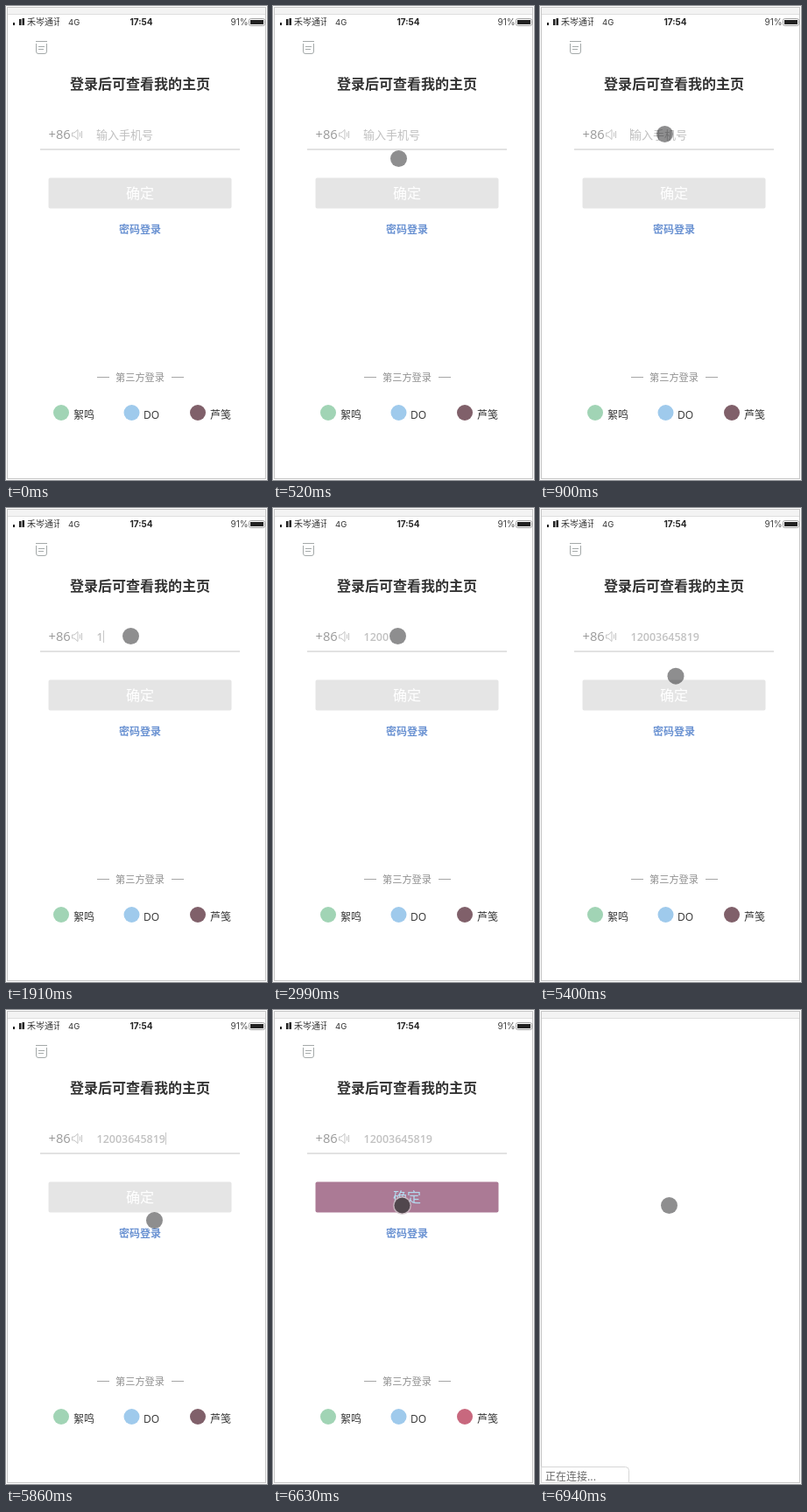
Animation of 298 by 542 pixels, one loop 8000 ms. Source, as an HTML page with a canvas:

```html
<!DOCTYPE html>
<html lang="zh-CN">
<head>
<meta charset="utf-8">
<title>登录</title>
<style>
html, body { margin: 0; width: 298px; height: 542px; overflow: hidden; background: #fff; }
canvas { display: block; }
</style>
</head>
<body>
<canvas id="stage" width="298" height="542"></canvas>
<script>
const ctx = document.getElementById('stage').getContext('2d');
const LOOP = 8000, TICK = 77.3;
const CJK = '"Noto Sans CJK SC", "Noto Sans CJK", sans-serif';
const LATIN = '"Open Sans", "Noto Sans", sans-serif';
const STATUS = 'Inter, Roboto, sans-serif';

const PHONE = '12003645819';
const KEY_TIMES = [1910, 1990, 2300, 2450, 3140, 3370, 3760, 4000, 4240, 4620, 4850];
const FOCUS = 870, PRESS = 6630, RELEASE = 6710, LEAVE = 6940;

// Pointer waypoints: time, x, y
const PATH = [
  [130, 178, 296], [520, 143.5, 174.5], [750, 142.5, 146.5],
  [5255, 142.5, 146.5], [5560, 161, 214], [5860, 169.5, 240.5],
  [6020, 147.5, 223.5]
];

function text(str, x, y, font, color, align = 'left') {
  ctx.font = font;
  ctx.fillStyle = color;
  ctx.textAlign = align;
  ctx.textBaseline = 'alphabetic';
  ctx.fillText(str, x, y);
}

function rect(x, y, w, h, color) {
  ctx.fillStyle = color;
  ctx.fillRect(x, y, w, h);
}

function disc(x, y, r, color) {
  ctx.fillStyle = color;
  ctx.beginPath();
  ctx.arc(x, y, r, 0, Math.PI * 2);
  ctx.fill();
}

function strokePath(d, color, width = 1) {
  ctx.strokeStyle = color;
  ctx.lineWidth = width;
  ctx.stroke(new Path2D(d));
}

function drawWindow() {
  rect(0, 0, 298, 542, '#fff');
  rect(2, 2, 295, 7, '#f3f3f3');
  rect(2, 9, 295, 1, '#dedede');
  ctx.strokeStyle = '#c6c6c6';
  ctx.lineWidth = 1;
  ctx.strokeRect(1.5, 1.5, 295, 539);
}

function drawStatusBar() {
  rect(8, 19, 2, 3, '#222');
  rect(15, 15, 2.5, 7, '#222');
  rect(18.5, 14, 2.5, 8, '#222');
  ctx.save();
  ctx.beginPath();
  ctx.rect(22, 10, 39, 16);
  ctx.clip();
  text('禾岑通讯', 24, 22, '10px ' + CJK, '#333');
  ctx.restore();
  text('4G', 71, 22, '9.5px ' + STATUS, '#333');
  text('17:54', 154.5, 22, 'bold 10px ' + STATUS, '#222', 'center');
  text('91%', 256.5, 22, '10px ' + STATUS, '#444');
  ctx.strokeStyle = '#a4a4a4';
  ctx.lineWidth = 1;
  ctx.beginPath();
  ctx.roundRect(277.5, 14.5, 18, 8, 2);
  ctx.stroke();
  rect(279, 16, 15, 5, '#222');
}

function drawIcons() {
  strokePath('M34 40.5H47M46.5 43V52Q46.5 54.5 44 54.5H37Q34.5 54.5 34.5 52V43M37 46.5H44M37 49.5H43', '#a4a9a9');
  strokePath('M75.5 145H78L82 141.5V152.5L78 149H75.5ZM84.5 144.5V149.5M86.5 143V151', '#c4c4c4');
}

function drawInput(t) {
  text('+86', 48.5, 152, '14.7px ' + LATIN, '#999');
  rect(39, 163, 228, 2, '#e2e2e2');

  const count = KEY_TIMES.filter(k => k <= t).length;
  const font = '600 12.5px ' + LATIN;
  let caretX = 103;
  if (count) {
    const typed = PHONE.slice(0, count);
    text(typed, 103.5, 152, font, '#c2c2c2');
    caretX = Math.round(103.5 + ctx.measureText(typed).width);
  } else {
    text('输入手机号', 103, 152, '13px ' + CJK, '#c0c0c0');
  }

  const lastKey = count ? KEY_TIMES[count - 1] : FOCUS;
  const caretOn = t >= FOCUS && t < PRESS && Math.floor((t - lastKey) / 500) % 2 === 0;
  if (caretOn) rect(caretX, 140, 1, 14, '#c8c8c8');
}

function drawButton(pressed) {
  ctx.fillStyle = pressed ? '#ab7a95' : '#e5e5e5';
  ctx.beginPath();
  ctx.roundRect(48.5, 196.5, 209, 35, 2);
  ctx.fill();
  text('确定', 153, 220, '16px ' + CJK, pressed ? '#b4dcf0' : '#fff', 'center');
}

function drawThirdParty(pressed) {
  text('第三方登录', 153, 428.5, '11.2px ' + CJK, '#8e8e8e', 'center');
  rect(104, 424, 14, 1, '#a6a6a6');
  rect(189, 424, 14, 1, '#a6a6a6');
  const links = [
    [63, 77, '絮鸣', '#a1d4b5', CJK],
    [143.5, 157, 'DO', '#9fcaec', LATIN],
    [219, 233, '芦笺', pressed ? '#c8687e' : '#80606a', CJK]
  ];
  for (const [iconX, x, label, color, family] of links) {
    disc(iconX, 465, 9, color);
    text(label, x, 472, '12px ' + family, '#333');
  }
}

function drawLogin(t) {
  const pressed = t >= PRESS;
  drawStatusBar();
  drawIcons();
  text('登录后可查看我的主页', 153, 95, 'bold 16px ' + CJK, '#333', 'center');
  drawInput(t);
  drawButton(pressed);
  text('密码登录', 153, 260, 'bold 12px ' + CJK, '#6a92d2', 'center');
  drawThirdParty(pressed);
}

function drawLoading() {
  ctx.fillStyle = '#fff';
  ctx.strokeStyle = '#d6d6d6';
  ctx.lineWidth = 1;
  ctx.beginPath();
  ctx.roundRect(1.5, 522.5, 100, 18, [0, 4, 0, 0]);
  ctx.fill();
  ctx.stroke();
  text('正在连接...', 6, 538, '12px ' + CJK, '#6a6a6a');
}

function pointerAt(t) {
  const next = PATH.findIndex(p => p[0] > t);
  if (next < 0) return PATH[PATH.length - 1].slice(1);
  if (next === 0) return PATH[0].slice(1);
  const [t0, x0, y0] = PATH[next - 1], [t1, x1, y1] = PATH[next];
  const u = (t - t0) / (t1 - t0), e = u * (2 - u);
  return [x0 + (x1 - x0) * e, y0 + (y1 - y0) * e];
}

function drawPointer(t) {
  if (t < 130) return;
  const sampled = 130 + Math.floor((t - 125) / TICK) * TICK;
  const [x, y] = pointerAt(sampled);
  if (t >= PRESS && t < RELEASE) {
    disc(x, y, 10.5, 'rgba(205,190,198,.8)');
    disc(x, y, 9, '#51474d');
  } else {
    disc(x, y, 9.5, 'rgba(30,30,32,.5)');
  }
}

function frame(now) {
  const t = now % LOOP;
  drawWindow();
  if (t < LEAVE) drawLogin(t);
  else drawLoading();
  drawPointer(t);
  requestAnimationFrame(() => frame(performance.now() - start));
}

const start = performance.now();
frame(0);
</script>
</body>
</html>
```
